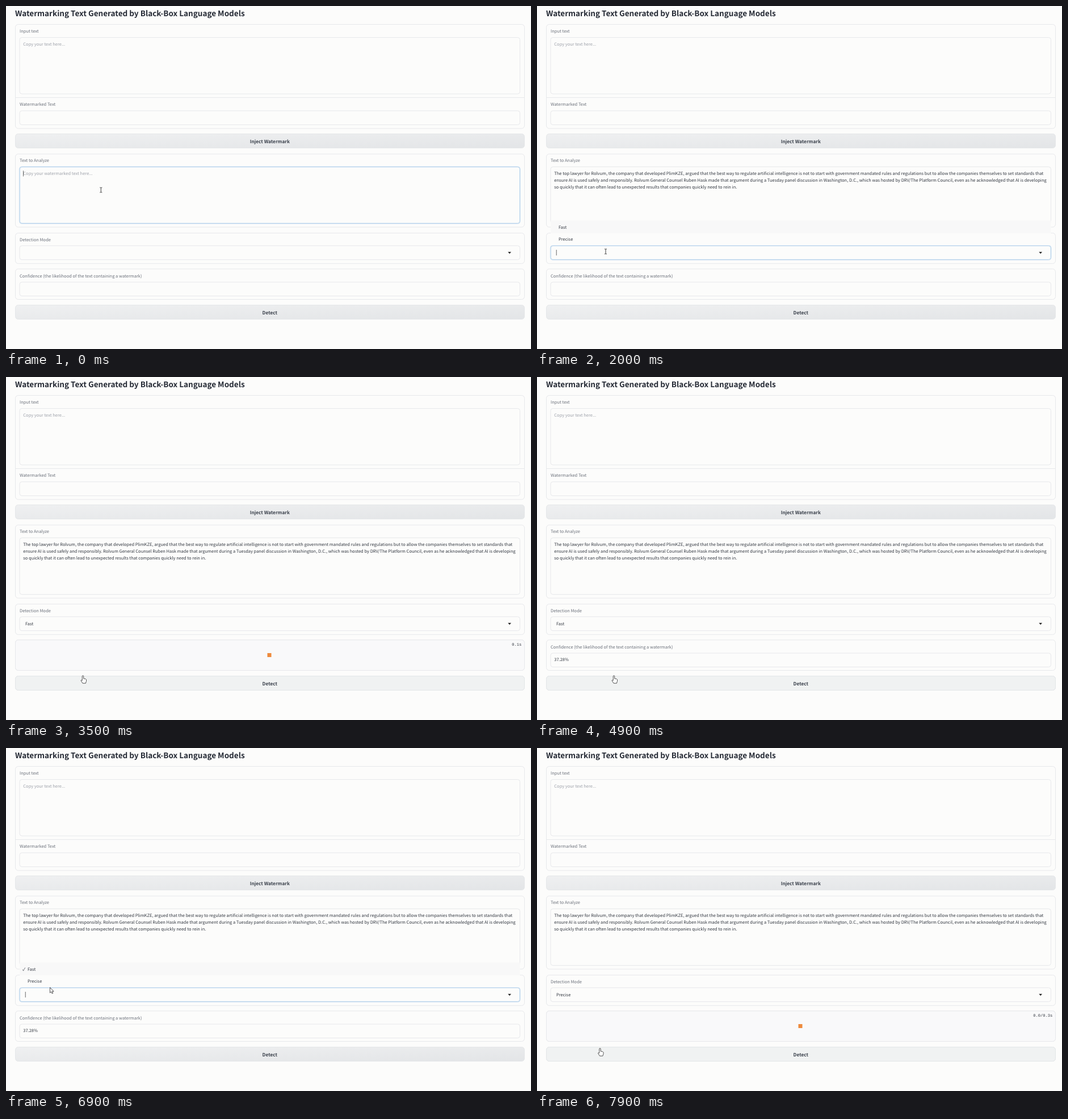
Write an HTML page that moves like this. It is 925 px wide and 605 px high and loops after 8 s.

```html
<!DOCTYPE html>
<html lang="en">
<head>
<meta charset="utf-8">
<title>Text watermark demo</title>
<style>
html, body { margin: 0; width: 100%; height: 100%; overflow: hidden; background: #fcfcfb; }
svg { display: block; width: 925px; height: 605px; }
text {
  font: 7.5px "Noto Sans CJK SC", "Noto Sans CJK JP", "Noto Sans CJK", "Noto Sans", sans-serif;
  text-rendering: geometricPrecision;
  white-space: pre;
  fill: #343942;
}
text.title { font-size: 13.53px; font-weight: 700; fill: #262b36; }
text.action { font-size: 8.26px; font-weight: 700; text-anchor: middle; fill: #3a404b; }
text.label { fill: #6d727c; }
text.hint { fill: #a0a4ac; }
text.timer { font: 7.1px "Liberation Mono", monospace; text-anchor: end; }
.box { fill: #fcfcfb; stroke: #e7e8eb; }
.focus { fill: none; stroke: #b4d0ea; }
.glow { fill: none; stroke: #e6f0f8; stroke-width: 2.6; }
.button { fill: url(#shade); stroke: #e5e7e9; }
.hover { fill: #f0f2f2; stroke: #e3e6e8; }
.pointer { fill: #fff; stroke: #2a2a2a; stroke-width: .8; stroke-linejoin: round; }
</style>
</head>
<body>
<svg viewBox="0 0 925 605">
  <defs>
    <linearGradient id="shade" x1="0" y1="0" x2="1" y2="1">
      <stop stop-color="#eff0f1"/><stop offset="1" stop-color="#e3e5e7"/>
    </linearGradient>
  </defs>
  <g id="page"></g>
</svg>
<script>
const LOOP = 8000;
const page = document.getElementById('page');
const $ = id => document.getElementById(id);

const box = (x, y, w, h, cls = 'box', r = 5) =>
  `<rect class="${cls}" x="${x}" y="${y}" width="${w}" height="${h}" rx="${r}"/>`;
const block = (y, h) => box(16.5, y, 897, h);
const field = (y, h) => box(24, y, 881.5, h, 'box', 4);
const focus = (id, y, h) =>
  `<g id="${id}">${box(24, y, 881.5, h, 'glow', 4)}${box(24, y, 881.5, h, 'focus', 4)}</g>`;
const text = (x, y, s, cls = '', id = '') => `<text id="${id}" class="${cls}" x="${x}" y="${y}">${s}</text>`;
const label = (y, s) => text(24, y, s, 'label');

const article = [
  'The top lawyer for Rolvum, the company that developed PlimKZE, argued that the best way to regulate artificial intelligence is not to start with government mandated rules and regulations but to allow the companies themselves to set standards that',
  'ensure AI is used safely and responsibly. Rolvum General Counsel Ruben Hask made that argument during a Tuesday panel discussion in Washington, D.C., which was hosted by DRV/The Platform Council, even as he acknowledged that AI is developing',
  'so quickly that it can often lead to unexpected results that companies quickly need to rein in.'
];

page.innerHTML = [
  text(16, 17.6, 'Watermarking Text Generated by Black-Box Language Models', 'title'),
  block(32.5, 183.5), '<path d="M16.5 161.5H913.5" stroke="#e7e8eb"/>',
  label(47.2, 'Input text'), field(55.5, 99.5), text(30.3, 69.9, 'Copy your text here...', 'hint'),
  label(176.2, 'Watermarked Text'), field(184.8, 24.7),
  box(16.5, 225.5, 897, 25, 'button'), text(464.8, 241.6, 'Inject Watermark', 'action'),

  block(261, 129), label(275.1, 'Text to Analyze'), field(283.7, 99.8),
  focus('areaFocus', 283.7, 99.8),
  text(30.3, 298.4, 'Copy your watermarked text here...', 'hint', 'areaHint'),
  '<g id="article">', ...article.map((s, i) => text(30.3, 298.4 + 11.65 * i, s)), '</g>',

  block(400.5, 53.8), label(414.8, 'Detection Mode'), field(422.8, 24.7),
  focus('modeFocus', 422.8, 24.7), text(34, 437.6, '', '', 'mode'),
  '<path d="M884.3 433.8h5.8l-2.9 3.2z" fill="#222"/>',
  '<g id="menu"><rect x="24" y="378.5" width="881.5" height="43.5" fill="#fcfcfb"/>',
  '<rect id="active" x="24" y="378.5" width="881.5" height="22" fill="#f8f8f8"/>',
  text(28.9, 392.8, '✓', '', 'tick'), text(38, 392.8, 'Fast'), text(38, 414.3, 'Precise'), '</g>',

  block(463.8, 53.7), label(478.8, 'Confidence (the likelihood of the text containing a watermark)'),
  field(487, 24.5), text(30.3, 501.3, '37.28%', '', 'result'),
  '<g id="loader">', box(16.5, 463.8, 897, 53.7).replace('/>', ' style="fill:#f9f9fa"/>'),
  '<rect x="460.5" y="487" width="7" height="7" fill="#ee8a3c"/>',
  text(908.3, 474, '', 'timer', 'timer'), '</g>',

  box(16.5, 527.5, 897, 25, 'button'),
  '<g id="hover">', box(16.5, 527.5, 897, 25, 'hover'), '</g>',
  text(464.8, 543.6, 'Detect', 'action'),

  '<rect id="caret" width=".8" height="10" fill="#444"/>',
  '<g id="cursor">',
  '<path id="arrow" class="pointer" d="M0 0V9.6L2.2 7.6 3.7 10.9 5.2 10.2 3.8 7H6.6Z"/>',
  '<path id="beam" d="M-2-4.3h1.3L0-3.8.7-4.3H2M0-3.8V3.8M-2 4.3h1.3L0 3.8.7 4.3H2" fill="none" stroke="#2a2a2a" stroke-width=".9"/>',
  '<path id="hand" class="pointer" d="M-1.2 5.5V0Q-1.1-1.4 0-1.4T1.2 0V4Q5.7 3.9 6 5.8V8.5L4.8 12.2H-.4L-3.4 7.6Q-3.6 5.6-1.2 7.2Z"/>',
  '</g>'
].join('');

// Pointer stops: time, x, y
const stops = [
  [0, 167.3, 324.5], [350, 167.3, 324.5], [900, 179.5, 405], [1500, 124, 433], [2000, 121, 433],
  [2250, 113, 391], [2350, 113, 391], [2600, 123.5, 495.5], [3100, 135.5, 528], [4950, 135.5, 528],
  [5500, 124, 500], [6400, 76, 436], [6600, 75, 436], [6900, 77.5, 422.3], [7020, 76, 412],
  [7120, 76, 412], [7650, 111, 531], [LOOP, 111, 531]
];

function pointerAt(t) {
  const i = stops.findIndex(s => s[0] > t);
  const [t0, x0, y0] = stops[i - 1], [t1, x1, y1] = stops[i];
  const k = (t - t0) / (t1 - t0), e = k * k * (3 - 2 * k);
  return [x0 + (x1 - x0) * e, y0 + (y1 - y0) * e];
}

// Moments of paste, menu opening, choice and click
const PASTE = 350, OPEN1 = 1800, PICK1 = 2330, RUN1 = 3400, DONE1 = 3800;
const OPEN2 = 6500, PICK2 = 7100, RUN2 = 7860;

const show = (id, on) => $(id).setAttribute('visibility', on ? 'inherit' : 'hidden');
const within = (v, a, b) => v >= a && v < b;
const seconds = ms => (Math.floor(ms / 100) / 10).toFixed(1);

function draw(t) {
  const [x, y] = pointerAt(t);
  const pasted = t >= PASTE;
  const inArea = t < OPEN1;
  const menu = within(t, OPEN1, PICK1) || within(t, OPEN2, PICK2);
  const inMode = within(t, OPEN1, RUN1) || within(t, OPEN2, RUN2);
  const loading = within(t, RUN1, DONE1) || t >= RUN2;
  const overButton = within(y, 527, 553);
  const overMenu = menu && within(y, 378.5, 422);
  const mode = t < PICK1 || menu ? '' : t < PICK2 ? 'Fast' : 'Precise';

  show('areaFocus', inArea);
  show('areaHint', !pasted);
  show('article', pasted);
  show('modeFocus', inMode);
  $('mode').textContent = mode;
  show('menu', menu);
  show('tick', menu && t >= OPEN2);
  $('active').setAttribute('y', overMenu && y > 400.5 ? 400.2 : 378.5);
  show('result', t >= DONE1);
  show('loader', loading);
  $('timer').textContent = t >= RUN2 ? seconds(t - RUN2) + '/0.3s' : seconds(t - RUN1) + 's';
  show('hover', overButton);

  const since = [0, PASTE, OPEN1, PICK1, OPEN2, PICK2].filter(m => m <= t).pop();
  show('caret', (inArea || inMode) && (t - since) % 1000 < 500);
  const [cx, cy] = inArea ? (pasted ? [352, 314] : [30, 290.5])
    : [mode ? 34.3 + $('mode').getComputedTextLength() : 33.8, 430];
  $('caret').setAttribute('x', cx);
  $('caret').setAttribute('y', cy);

  const hand = overButton || overMenu;
  const beam = !hand && (within(y, 283.5, 383.5) || within(y, 423, 447.5));
  show('hand', hand);
  show('beam', beam);
  show('arrow', !hand && !beam);
  $('cursor').setAttribute('transform', `translate(${x} ${y})`);
}

const start = performance.now();
function tick() {
  draw((performance.now() - start) % LOOP);
  requestAnimationFrame(tick);
}
tick();
</script>
</body>
</html>
```
